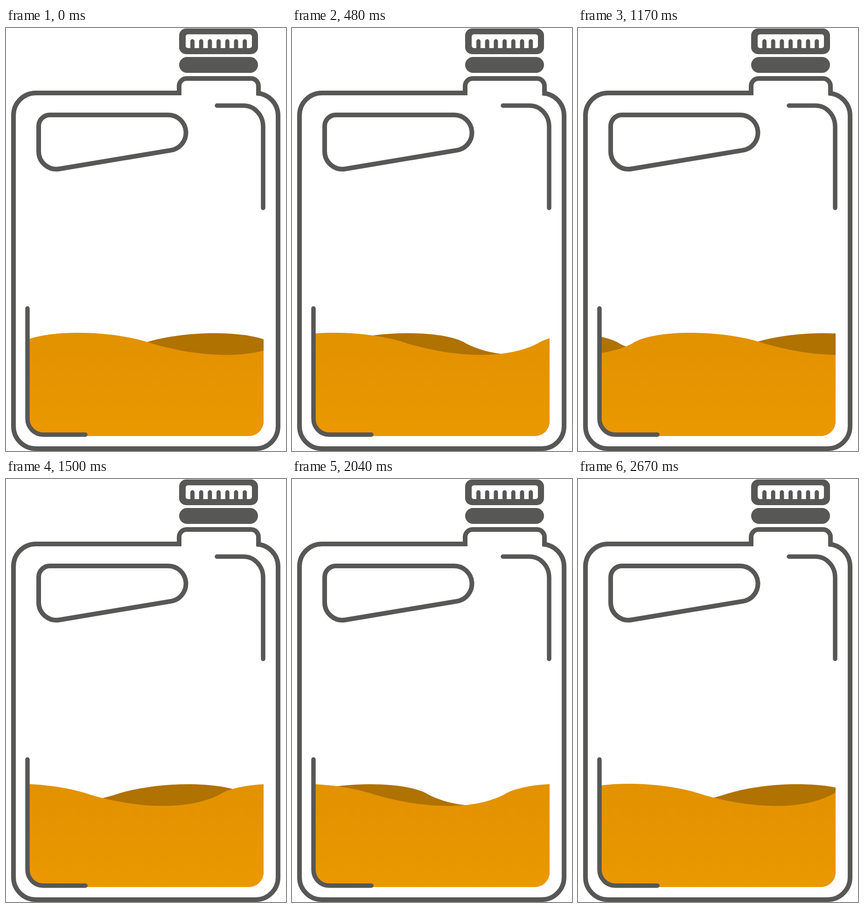
Write an HTML page that moves like this. It is 600 by 905 pixels and loops after 2.7 s.

```html
<!DOCTYPE html>
<html lang="en">
<head>
<meta charset="utf-8">
<title>Canister</title>
<style>
  html, body { margin: 0; width: 100%; height: 100%; overflow: hidden; background: #fff; }
  svg { display: block; width: 600px; height: 905px; }
  .line { fill: none; stroke: #575756; stroke-width: 10; }
  .round { stroke-linecap: round; }
  .solid { fill: #575756; }
</style>
</head>
<body>
<svg viewBox="0 0 600 905">
  <defs>
    <clipPath id="tank">
      <path d="M50 600H552V841A32 32 0 0 1 520 873H82A32 32 0 0 1 50 841Z"/>
    </clipPath>
    <linearGradient id="oil" gradientUnits="userSpaceOnUse" x1="0" y1="652" x2="0" y2="873">
      <stop offset="0" stop-color="#e29200"/>
      <stop offset="1" stop-color="#eb9800"/>
    </linearGradient>
  </defs>

  <g clip-path="url(#tank)">
    <path id="back" fill="#b07200"/>
    <path id="front" fill="url(#oil)"/>
  </g>

  <!-- body, neck and handle -->
  <path class="line" d="M376 139H64A48 48 0 0 0 16 187V852A48 48 0 0 0 64 900H535A48 48 0 0 0 583 852V187A48 48 0 0 0 537 139.5"/>
  <path class="line" d="M371 144V124A16 16 0 0 1 387 108H525A16 16 0 0 1 541 124V144"/>
  <path class="line" d="M94 186H347A38 38 0 0 1 353 261.6L114 301.5A38 38 0 0 1 70 264V210A24 24 0 0 1 94 186Z"/>

  <!-- highlights -->
  <path class="line round" d="M452 166H509A42 45 0 0 1 551 211V385" style="stroke-width:9.5"/>
  <path class="line round" d="M46 600V836A34 34 0 0 0 80 870H170" style="stroke-width:9.5"/>

  <!-- cap -->
  <rect class="solid" x="371" y="62" width="169" height="34" rx="17"/>
  <rect class="solid" x="371" y="1" width="169" height="55" rx="15"/>
  <rect x="385" y="13.5" width="142" height="29.5" rx="5" fill="#fff"/>
  <path id="teeth" class="line round" style="stroke-width:9"/>
</svg>
<script>
  const LOOP = 2700, STEP = 30, WAVE = 562;
  const get = id => document.getElementById(id);

  // Swell with a crest at x = 0, a steep rise and a long fall.
  const swell = mid => `M${-127 - 2 * WAVE} ${mid}` +
    'c45 -31.6 198 -31.6 287 0c110 31.6 212 31.6 275 0'.repeat(5) + 'V900H-1251Z';

  const front = get('front'), back = get('back');
  front.setAttribute('d', swell(675.8));
  back.setAttribute('d', swell(676.6));

  let teeth = '';
  for (let i = 0; i < 7; i++) teeth += `M${399.5 + i * 18.7} 28.5V46`;
  get('teeth').setAttribute('d', teeth);

  const wrap = x => ((x % WAVE) + WAVE) % WAVE;

  function draw(now) {
    const t = Math.floor((now % LOOP) / STEP) * STEP;
    front.setAttribute('transform', `translate(${wrap(155 + 1.035 * t)} 0)`);
    back.setAttribute('transform', `translate(${wrap(447 - 0.4124 * t)} 0) scale(-1 1)`);
  }

  function tick() {
    draw(performance.now());
    requestAnimationFrame(tick);
  }
  tick();
</script>
</body>
</html>
```
